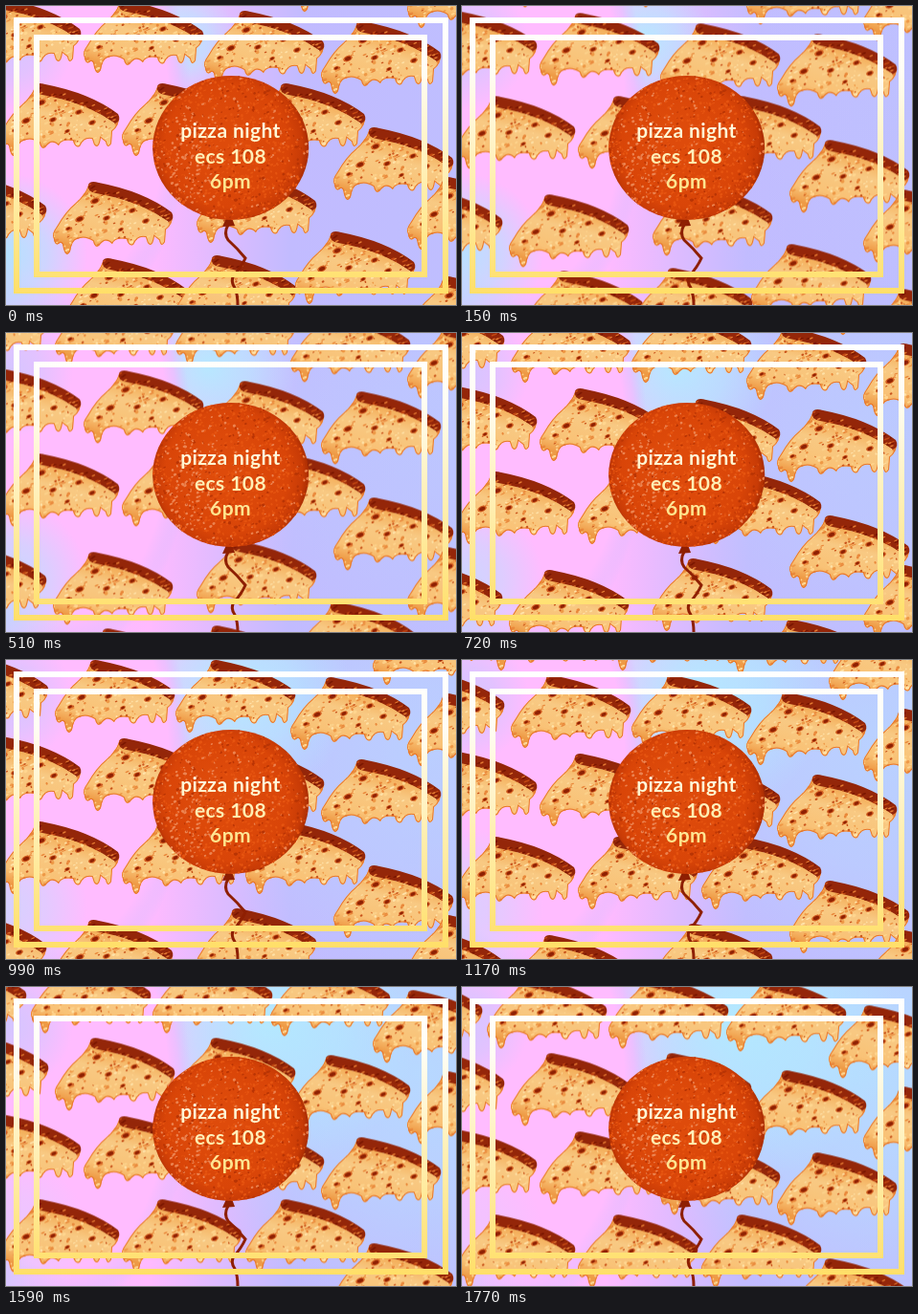
These frames come from a looping animation (470 px wide and 313 px high, 1.8 s). An HTML page with a canvas:

```html
<!DOCTYPE html>
<html lang="en">
<head>
<meta charset="utf-8">
<title>Pizza night</title>
<style>
  html, body { margin: 0; width: 470px; height: 313px; overflow: hidden; background: #e0bcff; }
  canvas, svg { position: absolute; left: 0; top: 0; display: block; }
  text { font: 700 21px "Comic Sans MS", "Comic Neue", Lato, "Open Sans", sans-serif; text-anchor: middle; letter-spacing: .4px; }
</style>
</head>
<body>
<canvas id="scene" width="470" height="313"></canvas>
<svg width="470" height="313" viewBox="0 0 470 313">
  <defs>
    <linearGradient id="gold" gradientUnits="userSpaceOnUse" x1="0" y1="12" x2="0" y2="301">
      <stop offset="0" stop-color="#fff"/>
      <stop offset=".2" stop-color="#fffdf4"/>
      <stop offset="1" stop-color="#ffdf68"/>
    </linearGradient>
    <linearGradient id="cream" gradientUnits="userSpaceOnUse" x1="0" y1="120" x2="0" y2="196">
      <stop offset="0" stop-color="#fffbe6"/>
      <stop offset="1" stop-color="#ffe283"/>
    </linearGradient>
  </defs>
  <g fill="none" stroke="url(#gold)" stroke-width="6">
    <rect x="11" y="15" width="448" height="283"/>
    <rect x="32" y="33" width="405" height="248"/>
  </g>
  <g fill="url(#cream)">
    <text x="234.5" y="138">pizza night</text>
    <text x="234.5" y="165">ecs 108</text>
    <text x="234.5" y="191">6pm</text>
  </g>
</svg>
<script>
const W = 470, H = 313, LOOP = 1800, STEP = 30, FALL = 160;
const scene = document.getElementById('scene').getContext('2d');

// Where each slice starts: left edge and top of its crust.
const slices = [
  [-105, -168], [25, -168], [152, -168], [275, -165], [382, -137],
  [-82, -92], [50, -87], [176, -87], [296, -69], [418, -52],
  [-48, -7], [80, -5], [206, 6], [328, 17],
  [-8, 82], [120, 82], [249, 82], [341, 128],
  [-84, 178], [48, 185], [198, 173], [418, 180],
  [63, 265], [177, 262], [301, 237], [418, 284]
];

const body = new Path2D('M38 3 Q85 8 126 34 Q126 44 119 49 L118 62 Q114 69 112 60 ' +
  'L107 56 Q105 69 100 63 L98 57 Q89 55 85 65 Q80 67 78 59 Q66 57 63 64 ' +
  'Q56 56 49 66 Q45 69 43 61 Q34 55 26 59 Q21 60 19 72 Q15 79 12 69 ' +
  'Q11 60 7 64 Q3 66 2 59 Q-1 54 5 46 Q14 30 25 21 Q35 12 38 3Z');
const crust = new Path2D('M38 2 Q40 -3 49 0 Q96 9 125 31 Q129 38 122 41 Q92 19 46 11 Q36 9 38 2Z');
const ribbon = new Path2D('M232 229 Q227 238 232 245 Q242 254 250 264 ' +
  'Q246 273 238 282 Q234 288 239 295 Q242 302 242 313');
const knot = new Path2D('M230 222 L236 222 L239 230 L226 231Z');

function seeded(seed) {
  return () => (seed = (seed * 16807) % 2147483647) / 2147483647;
}

function layer(w, h, paint) {
  const c = document.createElement('canvas');
  c.width = w;
  c.height = h;
  paint(c.getContext('2d'));
  return c;
}

function dot(g, x, y, rx, ry, color) {
  g.fillStyle = color;
  g.beginPath();
  g.ellipse(x, y, rx, ry, -.4, 0, 7);
  g.fill();
}

function gradient(g, shape, stops) {
  stops.forEach(([at, color]) => shape.addColorStop(at, color));
  g.fillStyle = shape;
}

const slice = layer(134, 86, g => {
  const rnd = seeded(417);
  g.translate(3, 5);
  g.save();
  g.clip(body);
  gradient(g, g.createLinearGradient(60, 10, 45, 72),
    [[0, '#f3a850'], [.35, '#f8c983'], [.75, '#f9c276'], [1, '#ee9a45']]);
  g.fillRect(-3, -5, 134, 86);
  const tones = ['#ffe2a8', '#ffd58e', '#ee9947', '#e9883b', '#fbd089'];
  for (let i = 0; i < 330; i++) {
    dot(g, rnd() * 128, rnd() * 78, .6 + rnd() * 2.2, .5 + rnd() * 1.2, tones[i % 5]);
  }
  for (let i = 0; i < 48; i++) {
    dot(g, rnd() * 122, 12 + rnd() * 50, .5 + rnd() * 1.1, .5 + rnd() * .8, '#c9541c');
  }
  [[45, 19, 5], [29, 38, 5], [57, 37, 4], [84, 29, 4], [98, 40, 4], [17, 48, 3], [72, 49, 3]]
    .forEach(([x, y, r]) => {
      dot(g, x, y, r, r * .6, '#d25d20');
      dot(g, x, y, r * .65, r * .4, '#8f2103');
    });
  g.strokeStyle = '#e8762b';
  g.lineWidth = 2;
  g.stroke(body);
  g.restore();
  g.fillStyle = '#942609';
  g.fill(crust);
  g.save();
  g.clip(crust);
  for (let i = 0; i < 55; i++) {
    const x = 38 + rnd() * 88;
    dot(g, x, (x - 38) * .34 + rnd() * 11, 2, .8, ['#c34813', '#7a1600', '#e47a32'][i % 3]);
  }
  g.restore();
});

const balloon = layer(W, H, g => {
  const rnd = seeded(9283);
  g.strokeStyle = g.fillStyle = '#8e1f02';
  g.lineWidth = 3;
  g.stroke(ribbon);
  g.fill(knot);
  g.save();
  g.beginPath();
  g.ellipse(234.7, 148.5, 81.5, 75.5, 0, 0, 7);
  g.clip();
  gradient(g, g.createRadialGradient(222, 140, 20, 234, 148, 83),
    [[0, '#de4b0b'], [.7, '#d94508'], [.9, '#c83b06'], [1, '#a52b02']]);
  g.fillRect(150, 70, 170, 160);
  for (let i = 0; i < 1500; i++) {
    const x = 153 + rnd() * 163, y = 73 + rnd() * 151, pick = rnd();
    const left = Math.exp(-(((x - 187) / 25) ** 2) - ((y - 153) / 58) ** 2);
    const color = pick < .1 + left * .65 ? '#ec8350' : pick < .82 ? '#e65410' : '#b93404';
    dot(g, x, y, .5 + rnd() * 1.3, .5 + rnd(), color);
  }
  g.restore();
});

function glow(x, y, r, rgb, alpha) {
  gradient(scene, scene.createRadialGradient(x, y, 0, x, y, r),
    [[0, `rgba(${rgb},${alpha})`], [.5, `rgba(${rgb},${alpha * .65})`], [1, `rgba(${rgb},0)`]]);
  scene.fillRect(0, 0, W, H);
}

function backdrop(p) {
  gradient(scene, scene.createLinearGradient(0, 0, W, 25),
    [[0, '#d2c4ff'], [.09, '#f4beff'], [.35, '#ffbaff'], [.5, '#dfbbff'], [.66, '#c2bbff'], [1, '#bfbeff']]);
  scene.fillRect(0, 0, W, H);
  glow(430, 90, 250, '182,220,255', p);
  glow(182 + 105 * p, 35, 60 + 110 * p, '178,236,255', .9);
  scene.save();
  scene.translate(62, 105);
  scene.scale(.56, 1);
  gradient(scene, scene.createRadialGradient(0, 0, 0, 0, 0, 235),
    [[0, '#ffbcff'], [.82, '#ffbcff'], [.9, 'rgba(240,188,255,.8)'], [1, 'rgba(214,190,255,0)']]);
  scene.fillRect(-240, -240, 480, 480);
  scene.restore();
  glow(0, 260, 85, '180,226,255', 1 - p * .8);
  glow(0, 40, 70, '200,200,255', .8);
}

function draw(t) {
  const p = t / LOOP;
  backdrop(p);
  for (const [x, y] of slices) scene.drawImage(slice, x - 3, y + FALL * p - 5);
  scene.drawImage(balloon, 0, 0);
}

const start = performance.now();
function tick() {
  const t = (performance.now() - start) % LOOP;
  draw(Math.floor(t / STEP) * STEP);
  requestAnimationFrame(tick);
}
tick();
</script>
</body>
</html>
```
